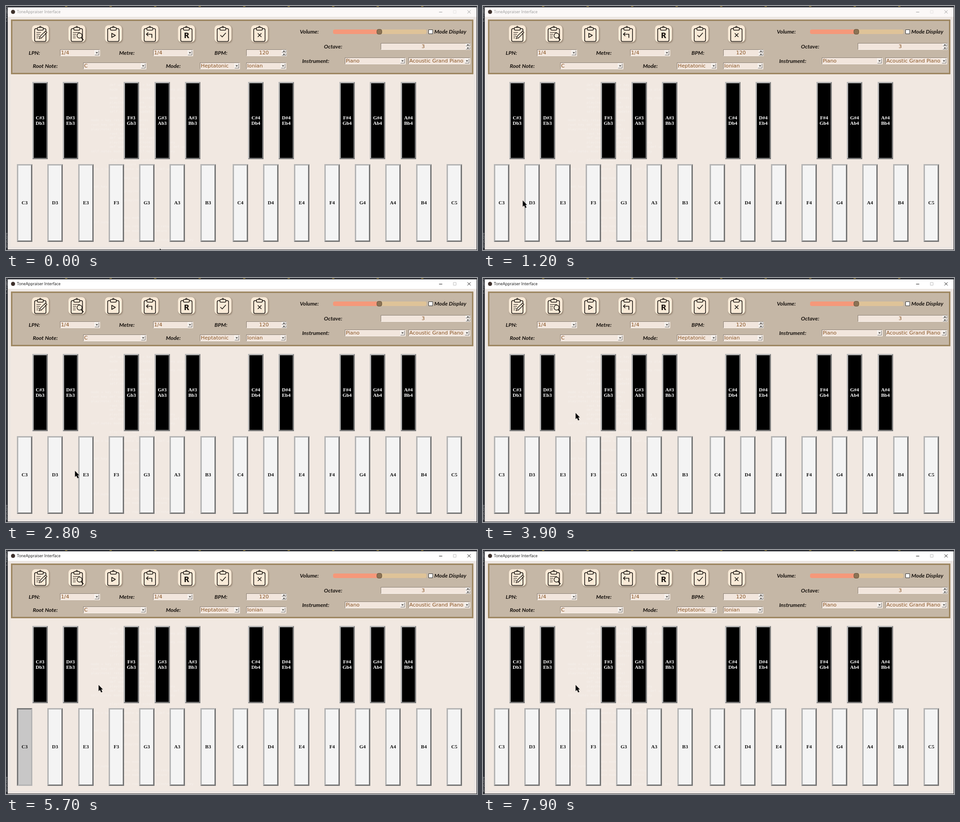
Recreate the animation shown at these times as an HTML page with a canvas. Size 1037x540 px, loop 8000 ms.

```html
<!DOCTYPE html>
<html lang="en">
<head>
<meta charset="utf-8">
<title>Piano interface</title>
<style>
  html, body { margin: 0; width: 100%; height: 100%; overflow: hidden; background: #2f3135; }
  canvas { display: block; }
</style>
</head>
<body>
<canvas id="stage" width="1037" height="540"></canvas>
<script>
const ctx = document.getElementById('stage').getContext('2d');
const LOOP = 8000, STEP = 100, ACTIVATED = 1300;
const LABEL = 'italic bold 12.2px Lato, sans-serif';
const FIELD = '11.2px "DejaVu Sans", sans-serif';
const NOTE = 'bold 11px "Liberation Serif", serif';
const INK = '#17120e', BROWN = '#85501f', CREAM = '#f9ead7';

function rect(x, y, w, h, color) {
  ctx.fillStyle = color;
  ctx.fillRect(x, y, w, h);
}

function text(str, x, y, font, color, align = 'left') {
  ctx.font = font;
  ctx.fillStyle = color;
  ctx.textAlign = align;
  ctx.textBaseline = 'middle';
  ctx.fillText(str, x, y);
}

function rounded(x, y, w, h, r, fill, stroke) {
  ctx.beginPath();
  ctx.roundRect(x, y, w, h, r);
  if (fill) { ctx.fillStyle = fill; ctx.fill(); }
  if (stroke) { ctx.strokeStyle = stroke; ctx.stroke(); }
}

function path(d, stroke, width = 1.5, fill) {
  const p = new Path2D(d);
  if (fill) { ctx.fillStyle = fill; ctx.fill(p); }
  if (stroke) { ctx.strokeStyle = stroke; ctx.lineWidth = width; ctx.stroke(p); }
}

function at(x, y, draw) {
  ctx.save();
  ctx.translate(x, y);
  draw();
  ctx.restore();
}

// Box with a mitred edge: light on top and left, dark on bottom and right
function bevel(x, y, w, h, b, light, dark, fill) {
  rect(x, y, w, h, dark);
  ctx.fillStyle = light;
  ctx.fill(new Path2D(`M${x} ${y}h${w}l${-b} ${b}h${2 * b - w}v${h - 2 * b}l${-b} ${b}z`));
  rect(x + b, y + b, w - 2 * b, h - 2 * b, fill);
}

function triangle(x, y, s) {
  path(`M${x - 2.5} ${y - s}h5l-2.5 ${2.6 * s}z`, null, 0, '#222');
}

function field(x, y, w) {
  bevel(x, y, w, 15, 1, '#8b8075', '#fbf5ef', '#f2e6dd');
}

function combo(x, y, w, value) {
  field(x, y, w);
  text(value, x + 2, y + 8, FIELD, BROWN);
  bevel(x + w - 12, y + 2, 10, 11, 1, '#fff', '#777', '#eee9e4');
  triangle(x + w - 7, y + 7.5, 1);
}

function spin(x, y, w, value) {
  field(x, y, w);
  text(value, x + (w - 11) / 2, y + 8, FIELD, BROWN, 'center');
  for (const [dy, s] of [[1, -1], [8, 1]]) {
    bevel(x + w - 11, y + dy, 10, 6, 1, '#fff', '#777', '#eee9e4');
    triangle(x + w - 6, y + dy + 3, s);
  }
}

const glyphs = [
  () => {
    path('M-9-3H1M-9 1h8M-9 5h6M-9 9h4', INK, 1.2);
    path('M-3 11l1.5-5L11-6l3 3L2 9.5z', INK, 1.2, CREAM);
    path('M8.5-3.5l3 3M-1.5 6L2 9.5', INK, 1);
  },
  () => {
    path('M-9-3H6M-9 1h7M-9 5h6M-9 9h6', INK, 1.2);
    path('M11 4a5.5 5.5 0 1 0-11 0a5.5 5.5 0 1 0 11 0z', INK, 1.4, CREAM);
    path('M9 8l5 6', INK, 2);
  },
  () => path('M-4-1L4 3.5L-4 8z', INK, 1.6),
  () => path('M-4-3L-8 1L-4 5M-8 1H4V9', INK, 1.7),
  () => text('R', 0, 4, '900 17px Lato, sans-serif', INK, 'center'),
  () => path('M-6 3L-2 7L6-2', INK, 1.5),
  () => path('M-4-1L4 7M4-1L-4 7', INK, 1.6),
];

function iconButton(glyph, i) {
  at(76 + 80.4 * i, 61.5, () => {
    ctx.save();
    ctx.shadowColor = '#6d5a4799';
    ctx.shadowBlur = 3;
    ctx.shadowOffsetX = ctx.shadowOffsetY = 1.5;
    rounded(-19, -19, 37.5, 37.5, 8, CREAM);
    ctx.restore();
    ctx.lineWidth = 1.5;
    ctx.lineJoin = 'round';
    rounded(-13, -11.5, 25, 28.5, 3, null, INK);
    rounded(-7, -14, 13, 6, 2, CREAM, INK);
    path('M-3-14q2.500-5 5 0', INK, 1.3);
    glyph();
  });
}

function desktop() {
  rect(0, 0, 1037, 540, '#303238');
  for (let i = 0; i < 9; i++) rect(130 + i * 98, 0, 5, 1.5, '#a08a45');
  for (const [str, y] of [['1: Project', 36], ['Structure', 536]])
    at(1, y, () => {
      ctx.rotate(-Math.PI / 2);
      text(str, 0, 0, '8px "Open Sans", sans-serif', '#b5b7ba');
    });
}

function titleBar(active) {
  const tone = active ? '#111' : '#999';
  rect(4, 3, 1032, 21, active ? '#fff' : '#fbf8f7');
  ctx.beginPath();
  ctx.arc(15.5, 13, 4.5, 0, 7);
  ctx.fillStyle = '#3d302b';
  ctx.fill();
  text('ToneAppraiser Interface', 24, 13.5, '8.6px "Open Sans", sans-serif', tone);
  path('M953.5 13.5h7', tone, 1);
  path('M985 10h6v6h-6z', active ? '#bbb' : '#e4e2e1', 1);
  path('M1016 9.5l7 7m0-7l-7 7', tone, 1);
}

// Faint code shining through the translucent window
function ghostCode() {
  const words = ['self.notes', 'def update', 'root_key', 'play(note)', 'mode = key', 'return'];
  let seed = 7;
  const random = () => (seed = seed * 16807 % 2147483647) / 2147483647;
  for (let y = 165; y < 520; y += 9.8) {
    if (random() < .3) continue;
    let line = '';
    for (let n = 1 + random() * 3; n > 0; n--) line += words[random() * 6 | 0] + ' ';
    text(line, random() < .3 ? 187 : 228, y, '7.5px "DejaVu Sans Mono", monospace', '#fff5');
  }
}

function panel() {
  rect(11, 30, 1018, 121, '#8e7650');
  rect(12, 31, 1016, 119, '#b09a72');
  rect(13, 32, 1014, 117, '#8e7650');
  rect(14, 33, 1012, 115, '#c5b7a6');
  glyphs.forEach(iconButton);

  const labels = [
    ['LPN:', 50, 104], ['Metre:', 249, 104], ['BPM:', 459, 104],
    ['Root Note:', 59, 133], ['Mode:', 352, 133], ['Volume:', 647, 57],
    ['Mode Display', 943, 57], ['Octave:', 700, 90], ['Instrument:', 652, 122],
  ];
  for (const [str, x, y] of labels) text(str, x, y, LABEL, INK);

  combo(119, 96, 88, '1/4');
  combo(324, 96, 88, '1/4');
  combo(170, 125, 139, 'C');
  combo(427, 125, 88, 'Heptatonic');
  combo(529, 125, 88, 'Ionian');
  combo(746, 114, 134, 'Piano');
  combo(886, 114, 136, 'Acoustic Grand Piano');
  spin(529, 96, 89, '120');
  spin(825, 82, 198, '3');

  rounded(720, 52, 206, 10, 4, '#dfc398');
  rounded(720, 52, 102, 10, 4, '#f5987a');
  ctx.lineWidth = 1;
  rounded(816.5, 51.5, 11, 11, 4, '#8c7355', '#66533c');
  path('M930.5 52.5h9v9h-9z', '#333', 1, '#fff');
}

const whites = [...Array(15).keys()].map(i => ({
  x: Math.round(24 + 67.28 * i + (i > 6 ? 4 : 0)), y: 350,
  name: 'CDEFGAB'[i % 7] + (3 + Math.floor(i / 7)),
}));
const blacks = [0, 1, 3, 4, 5, 7, 8, 10, 11, 12].map(i => {
  const octave = 3 + Math.floor(i / 7);
  return {
    x: Math.floor(58.25 + 67.2 * i + (i > 6 ? 4.4 : 0)), y: 168,
    sharp: 'CDEFGAB'[i % 7] + '#' + octave, flat: 'DEFGABC'[i % 7] + 'b' + octave,
  };
});

function keys(c3Down) {
  for (const { x, y, sharp, flat } of blacks) {
    bevel(x, y, 34, 171, 3, '#b4b4b4', '#777', '#000');
    text(sharp, x + 17, y + 80, NOTE, '#fff', 'center');
    text(flat, x + 17, y + 92, NOTE, '#fff', 'center');
  }
  whites.forEach(({ x, y, name }, i) => {
    if (i === 0 && c3Down) bevel(x, y, 34, 172, 3, '#777', '#b4b4b4', '#c8c7c7');
    else bevel(x, y, 34, 172, 3, '#b4b4b4', '#777', '#f4f4f4');
    text(name, x + 17, y + 86.5, NOTE, '#111', 'center');
  });
}

// Pointer stops: time, x, y
const route = [
  [0, 339, 537], [700, 266, 434], [1300, 52, 430], [2100, 52, 430],
  [2600, 152, 427], [2900, 152, 427], [3500, 204, 299], [LOOP, 204, 299],
];

function pointer(t) {
  const i = route.findIndex(stop => stop[0] > t);
  const [t0, x0, y0] = route[i - 1], [t1, x1, y1] = route[i];
  const k = (t - t0) / (t1 - t0);
  const x = x0 + (x1 - x0) * k, y = y0 + (y1 - y0) * k;
  const overKey = [...whites, ...blacks].some(key =>
    x >= key.x && x < key.x + 34 && y >= key.y && y < key.y + 171);
  at(x, y, () => overKey
    ? path('M-2 1q2-2 3 0v5l6 1.5q2 1 1.5 4l-1.5 5H1L-4 10q0-2 2-1z', '#444', .7, '#222')
    : path('M0 0V13L3 10.5L5.5 16L8 15L5.5 9.5H9z', '#444', .5, '#000'));
}

const between = (t, a, b) => t >= a && t < b;

function draw(now) {
  const t = Math.floor(now % LOOP / STEP) * STEP;
  desktop();
  rect(4, 24, 1032, 515, '#ece6e2');
  rect(10, 29, 1020, 504, '#f1e8e1');
  titleBar(t >= ACTIVATED);
  ghostCode();
  panel();
  keys(between(t, 1400, 2100) || between(t, 4800, 6800));
  pointer(t);
  requestAnimationFrame(draw);
}
draw(0);
</script>
</body>
</html>
```
